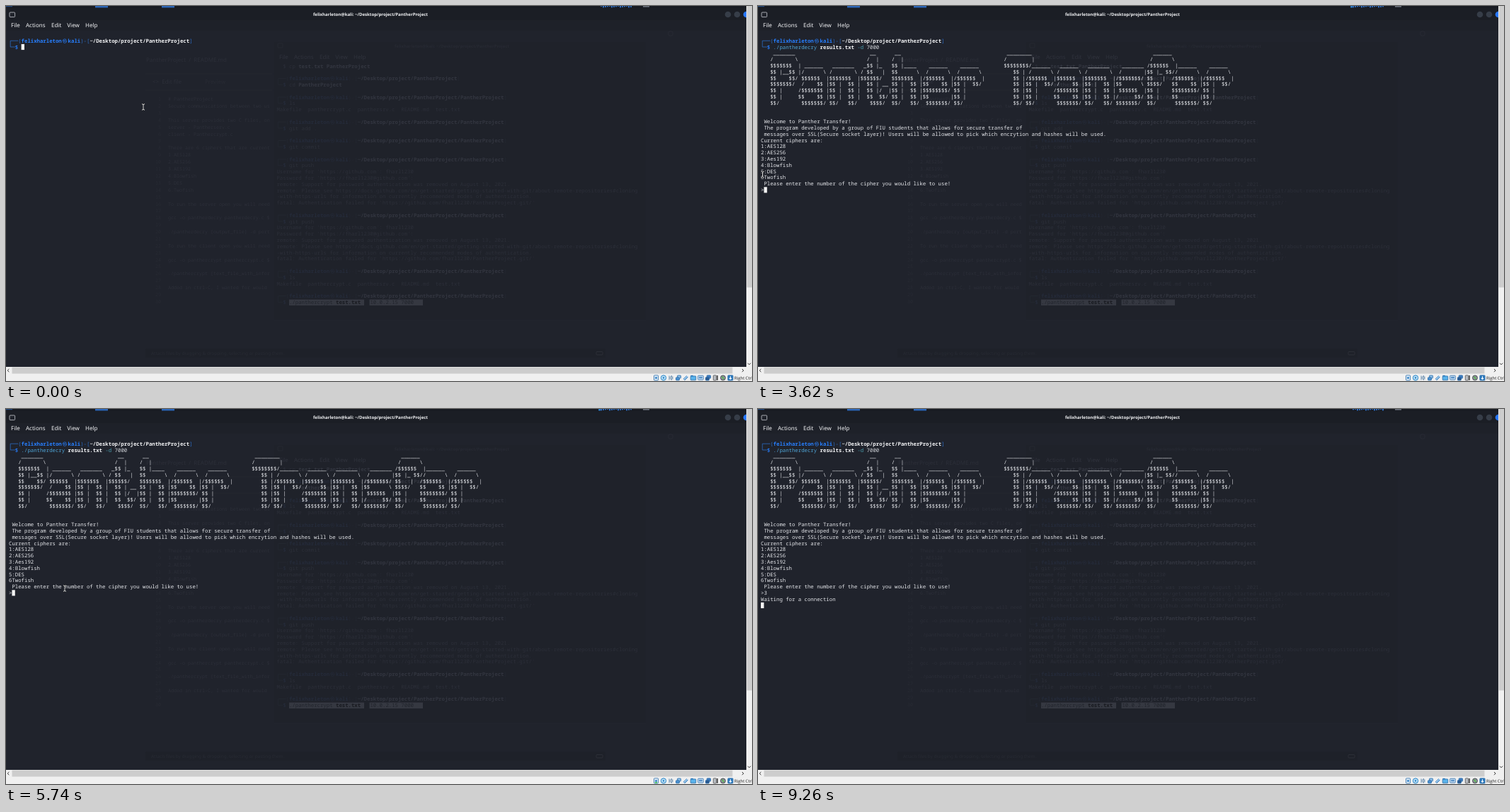
An HTML page that plays this animation: 1054x531 px, repeating every 9360 ms.

```html
<!DOCTYPE html>
<html lang="en">
<head>
<meta charset="utf-8">
<title>Terminal session</title>
<style>
  html, body { margin: 0; width: 100%; height: 100%; overflow: hidden; background: #20232c; }
  svg { display: block; width: 1054px; height: 531px; }
  text { white-space: pre; text-rendering: geometricPrecision; }
  .mono { font: 7.333px "Noto Sans Mono", "DejaVu Sans Mono", monospace; font-variant-ligatures: none; }
  .ui { font: 8px "Noto Sans", "Open Sans", sans-serif; }
  .bold { font-weight: 700; }
  .cjk { font: 6.4px "Noto Sans CJK SC", "Noto Sans CJK JP", "Noto Sans CJK KR", sans-serif; }
</style>
</head>
<body>
<svg id="stage" viewBox="0 0 1054 531" xmlns="http://www.w3.org/2000/svg"></svg>
<script>
const LOOP = 9360, CW = 4.4, LH = 8.8, LEFT = 4, BASE = 51.8;
const USER = 'felixharleton', LOGIN = 'fharl1230';
const HOME = '~/Desktop/project/PantherProject';
const WHITE = '#f2f3f5', BLUE = '#277fff', FRAME = '#2b6cc4', CMD = '#4fa6d8';
const GHOST = '#2c2f39', GHOST_BOLD = '#333640';
const stage = document.getElementById('stage');

function el(tag, attrs, parent = stage) {
  const node = document.createElementNS('http://www.w3.org/2000/svg', tag);
  for (const k in attrs) node.setAttribute(k, attrs[k]);
  parent.appendChild(node);
  return node;
}
const group = (attrs = {}, parent) => el('g', attrs, parent);
const rect = (x, y, width, height, fill, parent, more) => el('rect', { x, y, width, height, fill, ...more }, parent);
const line = (d, stroke, width, parent) => el('path', { d, stroke, 'stroke-width': width, fill: 'none' }, parent);
function text(x, y, str, fill, cls, parent, more) {
  const node = el('text', { x, y, fill, class: cls, ...more }, parent);
  node.textContent = str;
  return node;
}
const put = (row, col, str, fill, parent, cls = 'mono') =>
  text(LEFT + col * CW, BASE + row * LH, str, fill, cls, parent);
const show = (node, on) => node.setAttribute('visibility', on ? 'visible' : 'hidden');

// Terminal grid helpers, relative to the top-left text cell
function prompt(path, parent, c) {
  line('M17.2 49.2H6.2V58H12.8', c.frame, 0.8, parent);
  put(0, 3, '(', c.frame, parent);
  put(0, 4, USER, c.user, parent, 'mono bold');
  put(0, 17.2, '㉿', c.user, parent, 'cjk');
  put(0, 19, 'kali', c.user, parent, 'mono bold');
  put(0, 23, ')-[', c.frame, parent);
  put(0, 26, path, c.path, parent, 'mono bold');
  put(0, 26 + path.length, ']', c.frame, parent);
  put(1, 2, '$', c.user, parent, 'mono bold');
}

function menu(dx, y, fill, parent) {
  [['File', 7], ['Actions', 28], ['Edit', 64], ['View', 86.3], ['Help', 112]]
    .forEach(([s, x]) => text(x + dx, y, s, fill, 'ui', parent));
}

function ghostBrowser() {
  const g = group();
  text(198, 79, 'PantherProject  /  README.md', GHOST, 'ui', g);
  text(207, 110, '<>  Edit file', GHOST, 'ui', g);
  text(281, 110, 'Preview', '#282b34', 'ui', g);
  line('M197 96H376M197 119H376', '#262932', 0.6, g);
  const small = { style: 'font-size:6.67px' };
  const rows = {
    0: '# PantherProject', 1: 'Secure communications between two use',
    3: 'This server provides two C files, one', 4: 'server - Pantherserv.c', 5: 'client - Panthercrypt.c',
    7: 'There are 6 ciphers that are currentl', 8: '1.AES128', 9: '2.AES256', 10: '3.AES192',
    11: '4.Blowfish', 12: '5.DES', 13: '6.Twofish', 15: 'To run the server open you will need',
    17: 'gcc -o pantherdecry pantherdecry.c $(', 19: './pantherdecry [output_file] -d port',
    21: 'To run the client open you will need', 23: 'gcc -o panthercrypt panthercrypt.c $(',
    25: './panthercrypt [text_file_with_infor', 27: 'Added in ctrl-C, I wanted for would b'
  };
  for (let i = 0; i < 30; i++) {
    const y = 134.3 + i * 9.88;
    text(219, y, i + 1, '#282b34', 'mono', g, { 'text-anchor': 'end', ...small });
    if (rows[i]) text(229, y, rows[i].slice(0, 36), GHOST, 'mono', g, small);
  }
  rect(197, 485, 650, 13, '#1e2129', g, { rx: 1.5 });
  text(205, 493.6, 'Attach files by dragging & dropping, selecting or pasting them.', '#282b34', 'ui', g, { style: 'font-size:6.4px' });
  rect(834, 489.5, 9, 4.5, 'none', g, { rx: 1, stroke: '#30333c', 'stroke-width': 0.8 });
  el('circle', { cx: 939, cy: 39, r: 3.4, fill: 'none', stroke: '#2a2d36', 'stroke-width': 0.8 }, g);
}

function ghostTerminal() {
  rect(378, 50, 526, 395, '#1f222a');
  line('M378 445V50H904V445Z', '#23262f', 0.6);
  text(630, 59, USER + '@kali: ' + HOME, '#272a33', 'ui bold', stage, { 'text-anchor': 'middle', style: 'font-size:6.06px' });
  rect(384, 53, 7, 6, 'none', stage, { rx: 1, stroke: '#292c35', 'stroke-width': 0.7 });
  menu(379, 75, '#30333d');
  rect(400, 415.6, 106, 8.4, '#353841');
  rect(513.5, 415.6, 75.5, 8.4, '#353841');
  const g = group({ transform: 'translate(378.4 35.8)' });
  const colors = { frame: '#252933', user: '#252b3a', path: GHOST_BOLD };
  const deep = HOME + '/PantherProject';
  const say = (row, str) => put(row, 0, str, GHOST, g);
  const ask = (row, path, cmd, arg = '') => {
    prompt(path, group({ transform: `translate(0 ${row * LH})` }, g), colors);
    put(row + 1, 4, cmd, GHOST, g);
    put(row + 1, 5 + cmd.length, arg, GHOST_BOLD, g, 'mono bold');
  };
  const files = 'Makefile  panthercrypt.c  panthersrv.c  README.md  test.txt';
  put(0, 2, '$ cp', GHOST, g);
  put(0, 7, 'test.txt PantherProject', GHOST_BOLD, g, 'mono bold');
  ask(2, HOME, 'cd', 'PantherProject');
  ask(5, deep, 'ls');
  say(7, files);
  ask(9, deep, 'git add .');
  ask(12, deep, 'git commit');
  for (const row of [15, 24]) {
    ask(row, deep, 'git push');
    [`Username for 'https://github.com': ${LOGIN}`,
     `Password for 'https://${LOGIN}@github.com':`,
     'remote: Support for password authentication was removed on August 13, 2021.',
     'remote: Please see https://docs.github.com/en/get-started/getting-started-with-git/about-remote-repositories#cloning',
     '-with-https-urls for information on currently recommended modes of authentication.',
     `fatal: Authentication failed for 'https://github.com/${LOGIN}/PantherProject.git/'`
    ].forEach((s, i) => say(row + 2 + i, s));
  }
  ask(33, deep, 'ls');
  say(35, files);
  prompt(deep, group({ transform: `translate(0 ${37 * LH})` }, g), colors);
  put(38, 4, './panthercrypt', '#22252d', g);
  put(38, 19, 'test.txt', '#191b21', g, 'mono bold');
  put(38, 30, '10.0.2.15 7000', '#22252d', g);
}

function windowChrome() {
  rect(0, 0, 1054, 20, '#1b1e25');
  rect(0, 20, 1054, 15, '#1e2129');
  rect(0, 0, 1054, 2.6, '#171a21');
  rect(0, 0, 9, 1.2, '#244a80');
  rect(126, 0, 18, 2.4, '#2c66b8');
  rect(220, 0, 18, 2.4, '#2c66b8');
  rect(5, 9, 7.6, 6.6, '#20232b', stage, { rx: 1, stroke: '#c9ccd2', 'stroke-width': 0.8 });
  text(515, 14.3, USER + '@kali: ' + HOME, WHITE, 'ui bold', stage, { 'text-anchor': 'middle', style: 'font-size:6.06px' });
  menu(0, 29.8, WHITE);
  [[1020, '#363d48'], [1033, '#363d48'], [1046, '#2777ff']].forEach(([cx, fill]) => el('circle', { cx, cy: 12, r: 4.3, fill }));
}

// Viewer scroll bars and status strip
function viewerFrame() {
  rect(1046, 0, 8, 531, '#f0f0f0');
  rect(1046.6, 0, 7.4, 398.5, '#cdcdcd');
  rect(0, 511, 1054, 20, '#f0f0f0');
  rect(8.5, 511.6, 1018, 9, '#cdcdcd');
  line('M4.3 514L2.2 516.1L4.3 518.2M1040 514L1042.1 516.1L1040 518.2M1048 505.7L1050.1 507.8L1052.2 505.7', '#333', 1);
  text(1029, 528.7, 'Right Ctrl', '#1c1c1c', '', stage, { style: 'font:6px "Open Sans",sans-serif' });
}

function statusIcons() {
  const kinds = 'doppfswrmka';
  [...kinds].forEach((k, i) => {
    const g = group({ transform: `translate(${918.5 + i * 10.5} 526.5)` });
    const box = (x, y, w, h, f, s = '#2d6da8') => rect(x, y, w, h, f, g, { rx: 0.8, stroke: s, 'stroke-width': 0.8 });
    if (k === 'd') { box(-3, -3.6, 6, 7.2, '#dcebf8'); el('circle', { r: 1.5, fill: '#2f7fc4' }, g); }
    else if (k === 'o') { el('circle', { r: 3.6, fill: '#bfe0f5', stroke: '#2484c8', 'stroke-width': 1 }, g); el('circle', { r: 1.2, fill: '#2484c8' }, g); }
    else if (k === 'p' && i === 2) { line('M-2.5 -3V3M-1 -1.5L1 -3V3L-1 1.5ZM2.4 -2V2', '#5f86aa', 0.9, g); }
    else if (k === 'p') { box(-1.5, -3.4, 5, 4, '#8fbfe8'); box(-3.5, -0.6, 5, 4, '#4a90d0'); }
    else if (k === 'f') { line('M-2.6 2.6L2.2 -2.2', '#4589c6', 3.2, g); line('M-2.4 2.2L2.2 -2.4', '#bfe0f8', 1.2, g); }
    else if (k === 's') { box(-3.8, -2.5, 7.6, 5.8, '#58b2ea'); rect(-3.6, -3.6, 3.4, 1.4, '#2d78b8', g); }
    else if (k === 'w') { box(-3.8, -3.2, 7.6, 6, '#cfe4f6'); rect(-2.4, -1.6, 4.8, 2.6, '#5a92c8', g); }
    else if (k === 'r') { box(-1.8, -3.6, 5.4, 4.4, '#3f7cc0'); box(-3.6, -0.8, 5, 4.4, '#27578f'); }
    else if (k === 'm') { box(-3.2, -3.6, 4.4, 7.2, '#b8bcc2', '#555'); rect(1.8, -3.4, 1.6, 6.8, '#444', g); }
    else if (k === 'k') { el('circle', { r: 3.5, fill: '#8b8f96', stroke: '#3c4046', 'stroke-width': 0.8 }, g); line('M-1.5 -1.8L1.6 1.8', '#54c14c', 1.4, g); }
    else { box(-3.6, -3.6, 7.2, 7.2, '#2b79bd'); line('M0 -2.2V2M-1.7 0.3L0 2L1.7 0.3', '#fff', 1.1, g); }
  });
  return rect(916.9, 528.2, 3.2, 1.6, '#37c04a');
}

const PANTHER = String.raw`
 _______                        __      __
/       \                      /  |    /  |
$$$$$$$  | ______   _______   _$$ |_   $$ |____    ______    ______
$$ |__$$ |/      \ /       \ / $$   |  $$      \  /      \  /      \
$$    $$/ $$$$$$  |$$$$$$$  |$$$$$$/   $$$$$$$  |/$$$$$$  |/$$$$$$  |
$$$$$$$/  /    $$ |$$ |  $$ |  $$ | __ $$ |  $$ |$$    $$ |$$ |  $$/
$$ |     /$$$$$$$ |$$ |  $$ |  $$ |/  |$$ |  $$ |$$$$$$$$/ $$ |
$$ |     $$    $$ |$$ |  $$ |  $$  $$/ $$ |  $$ |$$       |$$ |
$$/       $$$$$$$/ $$/   $$/    $$$$/  $$/   $$/  $$$$$$$/ $$/
`;
const TRANSFER = String.raw`
 ________                                       ______
/        |                                     /      \
$$$$$$$$/______   ______   _______    _______ /$$$$$$  |______    ______
   $$ | /      \ /      \ /       \  /       |$$ |_ $$//      \  /      \
   $$ |/$$$$$$  |$$$$$$  |$$$$$$$  |/$$$$$$$/ $$   |  /$$$$$$  |/$$$$$$  |
   $$ |$$ |  $$/ /    $$ |$$ |  $$ |$$      \ $$$$/   $$    $$ |$$ |  $$/
   $$ |$$ |     /$$$$$$$ |$$ |  $$ | $$$$$$  |$$ |    $$$$$$$$/ $$ |
   $$ |$$ |     $$    $$ |$$ |  $$ |/     $$/ $$ |    $$       |$$ |
   $$/ $$/       $$$$$$$/ $$/   $$/ $$$$$$$/  $$/      $$$$$$$/ $$/
`;
const INTRO = [
  ' Welcome to Panther Transfer!',
  ' The program developed by a group of FIU students that allows for secure transfer of',
  ' messages over SSL(Secure socket layer)! Users will be allowed to pick which encrytion and hashes will be used.',
  'Current ciphers are:', '1:AES128', '2:AES256', '3:Aes192', '4:Blowfish', '5:DES', '6Twofish',
  ' Please enter the number of the cipher you would like to use!', '>'
];

rect(0, 0, 1054, 531, '#20232c');
ghostBrowser();
ghostTerminal();
windowChrome();
const net = Array.from({ length: 15 }, (_, i) => rect(840 + i * 3, 0, 2, 2, '#2f6fc4'));
const netDot = el('circle', { cx: 838.5, cy: 1.2, r: 1.3, fill: '#2f8fe8' });
rect(900, 0, 9, 1.6, '#6c727d');

prompt(HOME, stage, { frame: FRAME, user: BLUE, path: WHITE });
const hint = group();
put(1, 4, './', WHITE, hint);
put(1, 6, 'pantherdecry results.txt -d 7000', '#575c68', hint);
const command = group();
put(1, 4, './pantherdecry', CMD, command);
put(1, 19, 'results.txt', WHITE, command, 'mono bold');
put(1, 31, '-d', '#4a9fb0', command);
put(1, 34, '7000', '#d5d8dd', command);

const output = group();
[[PANTHER, 3], [TRANSFER, 78]].forEach(([art, col]) =>
  art.split('\n').slice(1, 10).forEach((s, i) => put(2 + i, col, s, '#e4e6ea', output)));
INTRO.forEach((s, i) => put(13 + i, 0, s, '#e4e6ea', output));
const answer = put(24, 1, '3', '#e4e6ea');
const waiting = put(25, 0, 'Waiting for a connection', '#e4e6ea');
const caret = rect(0, 0, CW, 8.2, '#f4f4f4');

const mouse = group();
const BEAM = 'M-2 -4.2Q0 -4.2 0 -3Q0 -4.2 2 -4.2M0 -3V3M-2 4.2Q0 4.2 0 3Q0 4.2 2 4.2';
line(BEAM, '#0c0d10', 1.9, mouse);
line(BEAM, '#fff', 0.9, mouse);

viewerFrame();
const diskLed = statusIcons();

// time, x, y
const PATH = [
  [0, 194, 143], [690, 194, 143], [870, 140, 124], [1030, 140, 124], [1050, 138.5, 123.5],
  [2720, 138.5, 123.5], [3030, 86, 178], [3450, 8, 237], [3800, 5, 240], [4230, 11, 212],
  [4600, 66, 250], [5100, 96, 240], [5740, 83, 254], [6400, 70, 262], [7070, 70, 262],
  [7450, 5, 287], [7820, 57, 282], [8010, 98, 287], [8540, 250, 545], [LOOP, 250, 545]
];
function mouseAt(t) {
  let i = 1;
  while (PATH[i][0] < t) i++;
  const [t0, x0, y0] = PATH[i - 1], [t1, x1, y1] = PATH[i];
  const k = (t - t0) / (t1 - t0);
  return [x0 + (x1 - x0) * k, y0 + (y1 - y0) * k];
}

// Caret cell over time: from, column, row
const CARET = [[0, 4, 1], [780, 6, 1], [1290, 38, 1], [2250, 1, 24], [6480, 2, 24], [6780, 0, 26]];

function render(t) {
  show(hint, t >= 780 && t < 1290);
  show(command, t >= 1290);
  show(output, t >= 2250);
  show(answer, t >= 6480);
  show(waiting, t >= 6780);
  const [, col, row] = CARET.filter(c => c[0] <= t).pop();
  caret.setAttribute('x', LEFT + col * CW);
  caret.setAttribute('y', 45.1 + row * LH);
  const [x, y] = mouseAt(t);
  mouse.setAttribute('transform', `translate(${x} ${y})`);
  const tick = Math.floor((t + 230) / 250);
  net.forEach((bar, i) => bar.setAttribute('height', 0.8 + 0.5 * ((i * 7 + tick * 5) % 4)));
  show(netDot, t >= 1520 && t < 7000);
  show(diskLed, (t >= 1760 && t < 2000) || (t >= 4900 && t < 5900) || (t >= 8270 && t < 8520));
}

function frame(now) {
  render(now % LOOP);
  requestAnimationFrame(frame);
}
render(0);
requestAnimationFrame(frame);
</script>
</body>
</html>
```
